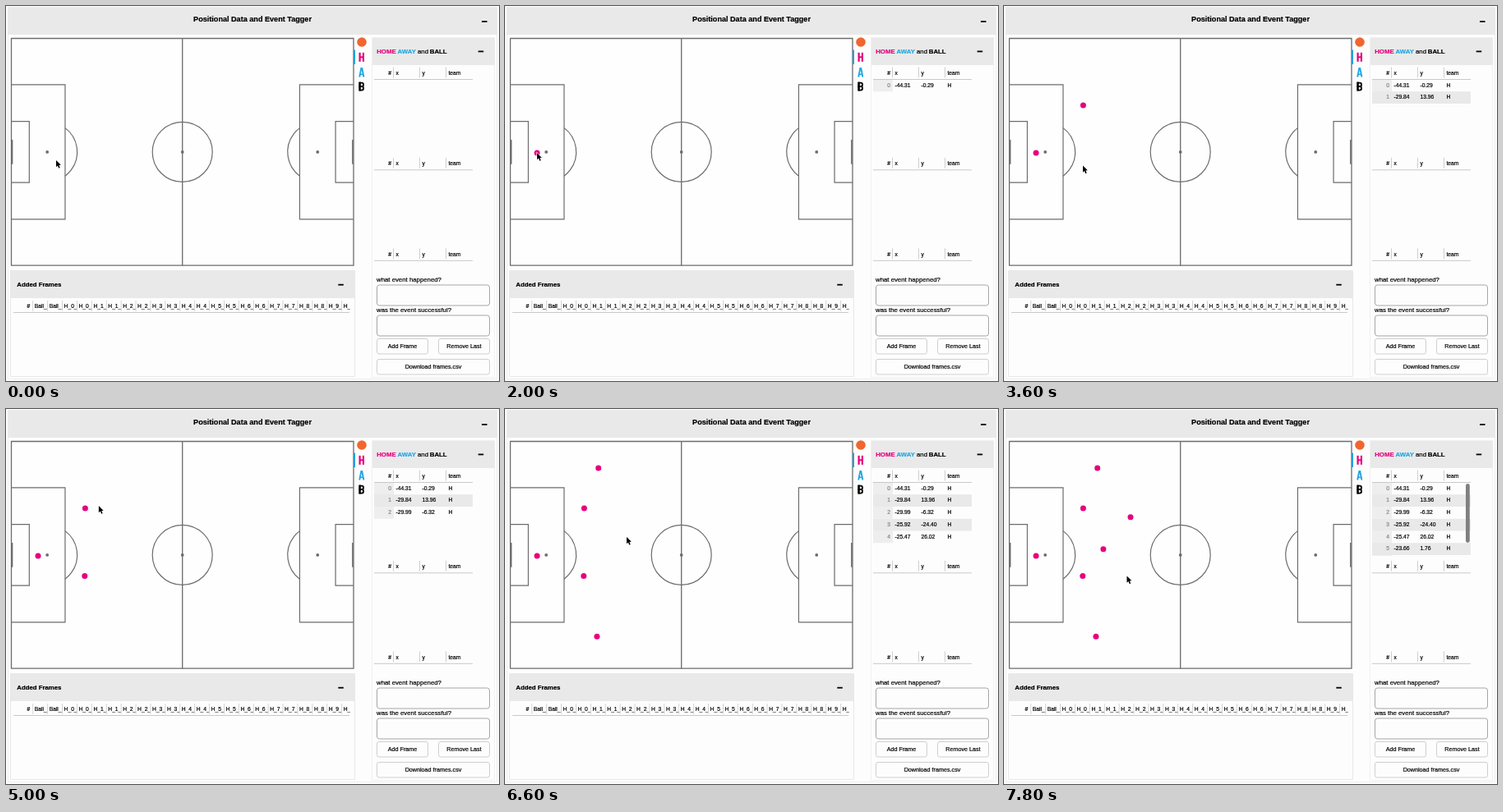
Animation of 600x457 px, one loop 8 s. Source, as an HTML page with a canvas:

```html
<!DOCTYPE html>
<html lang="en">
<head>
<meta charset="utf-8">
<title>Positional Data and Event Tagger</title>
<style>
html, body { margin: 0; width: 100%; height: 100%; overflow: hidden; background: #fdfdfd; }
canvas { display: block; width: 600px; height: 457px; }
</style>
</head>
<body>
<canvas id="stage"></canvas>
<script>
const W = 600, H = 457, LOOP = 8000, STEP = 200;
const PINK = '#e6007e', BLUE = '#22a7e0', LINE = '#6c6c6c', HEAD = '#e9e9e9', INK = '#000';
const canvas = document.getElementById('stage');
const g = canvas.getContext('2d');
const dpr = window.devicePixelRatio || 1;
canvas.width = W * dpr;
canvas.height = H * dpr;

// field metres to screen
const fx = m => 214.7 + m * 3.965;
const fy = m => 177.9 - m * 4.067;

const player = (shown, mx, my) => ({ shown, mx, my, x: fx(mx), y: fy(my) });
const players = [
  player(2000, -44.31, -0.29),
  player(3400, -29.84, 13.96),
  player(4400, -29.99, -6.32),
  player(5200, -25.92, -24.40),
  player(6000, -25.47, 26.02),
  player(6800, -23.66, 1.76),
  player(7400, -15.31, 11.35)
];

// pointer moves: leave time, arrival time, goal
const moves = [
  [0, 600, players[0]],
  [2000, 3000, players[1]],
  [3200, 3800, players[2]],
  [4000, 4600, players[3]],
  [4600, 5360, players[4]],
  [5500, 6100, players[5]],
  [6200, 6600, { x: 148, y: 156 }],
  [6600, 7000, players[6]],
  [7200, 7800, { x: 149.5, y: 203.5 }]
];

function pointerAt(t) {
  let x = 61, y = 188;
  for (const [leave, arrive, to] of moves) {
    const k = Math.min(1, Math.max(0, (t - leave) / (arrive - leave)));
    x += (to.x - x) * k;
    y += (to.y - y) * (1 - (1 - k) ** 2);
  }
  return [x, y];
}

function text(s, x, y, size, { color = INK, bold = false, align = 'left' } = {}) {
  g.font = `${bold ? 'bold ' : ''}${size}px "Liberation Sans", Arial, sans-serif`;
  g.textAlign = align;
  g.fillStyle = g.strokeStyle = color;
  g.lineWidth = 0.2;
  g.fillText(s, x, y);
  g.strokeText(s, x, y);
}

function fill(x, y, w, h, color) {
  g.fillStyle = color;
  g.fillRect(x, y, w, h);
}

function frame(x, y, w, h, color, lw = 1, r = 0) {
  g.beginPath();
  g.roundRect(x, y, w, h, r);
  g.strokeStyle = color;
  g.lineWidth = lw;
  g.stroke();
}

function disc(x, y, r, color) {
  g.beginPath();
  g.arc(x, y, r, 0, Math.PI * 2);
  g.fillStyle = color;
  g.fill();
}

function arc(x, y, r, from, to) {
  g.beginPath();
  g.arc(x, y, r, from, to);
  g.stroke();
}

function poly(points, color, lw) {
  g.beginPath();
  points.forEach(([x, y]) => g.lineTo(x, y));
  g.strokeStyle = color;
  g.lineWidth = lw;
  g.stroke();
}

function minus(x, y) {
  fill(x, y, 6.5, 1.8, INK);
}

function panels() {
  fill(0, 0, W, H, '#fdfdfd');
  frame(2.5, 1.5, 595, 453, '#ededed');
  frame(5.5, 322.5, 419, 129, '#e8e8e8');
  frame(445.5, 38.5, 149, 414, '#f0f0f0');
  fill(2, 2, 596, 33, HEAD);
  fill(6, 323, 418, 33, HEAD);
  fill(446, 39, 149, 33, HEAD);
  text('Positional Data and Event Tagger', 300, 19, 9.1, { bold: true, align: 'center' });
  text('Added Frames', 13.3, 342.3, 7.8, { bold: true });
  text('HOME', 451.2, 57.6, 7.8, { bold: true, color: PINK });
  text('AWAY', 476.6, 57.6, 7.8, { bold: true, color: BLUE });
  text('and', 501, 57.6, 7.8);
  text('BALL', 515.8, 57.6, 7.8, { bold: true });
  minus(579, 18);
  minus(574.7, 54.5);
  minus(404.3, 338.8);
}

function pitch() {
  const w = 52.5, r = 36.5;
  fill(6, 39, 418, 278, '#fefefe');
  frame(6.5, 39.5, 416.5, 276.7, LINE, 1.3);
  poly([[fx(0), 39], [fx(0), 316.5]], LINE, 1.3);
  g.lineWidth = 1.2;
  arc(fx(0), fy(0), r, 0, Math.PI * 2);
  disc(fx(0), fy(0), 1.9, LINE);
  for (const side of [-1, 1]) {
    const x = depth => fx(side * (w - depth));
    const area = (depth, half) =>
      poly([[x(0), fy(half)], [x(depth), fy(half)], [x(depth), fy(-half)], [x(0), fy(-half)]], LINE, 1.2);
    area(16.5, 20.16);
    area(5.5, 9.16);
    poly([[x(0.25), fy(3.66)], [x(0.25), fy(-3.66)]], LINE, 1.6);
    disc(x(11), fy(0), 1.9, LINE);
    const mid = side < 0 ? 0 : Math.PI;
    const half = Math.acos(5.5 * 3.965 / r);
    g.lineWidth = 1.2;
    arc(x(11), fy(0), r, mid - half, mid + half);
  }
}

function toolbar() {
  disc(433, 44, 5.8, '#f0662f');
  fill(423, 53.5, 2, 17.5, '#26a0da');
  fill(429.5, 56.8, 2.2, 11, PINK);
  fill(433.8, 56.8, 2.2, 11, PINK);
  fill(431, 61.3, 4, 2, PINK);
  poly([[430.2, 86.5], [432.3, 75.9], [433.3, 75.9], [435.4, 86.5]], BLUE, 1.9);
  fill(431, 82.5, 3.6, 1.6, BLUE);
  fill(429.5, 92.6, 2.2, 10.8, INK);
  g.strokeStyle = INK;
  g.lineWidth = 1.9;
  for (const y of [95.8, 100.3]) {
    g.beginPath();
    g.roundRect(430.5, y - 2.2, 4.5, 4.5, [0, 2, 2, 0]);
    g.stroke();
  }
}

function tableHead(y) {
  fill(448, y + 7.5, 120, 1, '#c9c9c9');
  ['x', 'y', 'team'].forEach((label, i) => {
    fill(471 + i * 32, y - 7, 1, 13, '#cfcfcf');
    text(label, 474.5 + i * 32, y + 2.4, 6.7);
  });
  text('#', 469, y + 2.4, 6.7, { align: 'right' });
}

function homeRows(list) {
  const rowH = 14.75;
  g.save();
  g.beginPath();
  g.rect(448, 90, 122, 89);
  g.clip();
  list.forEach((p, i) => {
    const y = 89.5 + i * rowH;
    fill(448, y, 24, rowH, '#eeeeee');
    if (i % 2) fill(448, y, 120, rowH, HEAD);
    text(i, 469, y + 9.1, 6.7, { color: '#858585', align: 'right' });
    [p.mx.toFixed(2), p.my.toFixed(2), 'H'].forEach((s, c) =>
      text(s, 474.5 + c * 32, y + 9.1, 6.7));
  });
  g.restore();
  if (list.length > 6) {
    g.beginPath();
    g.roundRect(562, 91, 4.8, 72, 2.4);
    g.fillStyle = '#808080';
    g.fill();
  }
}

function addedTable() {
  fill(9, 373, 409, 1, '#c9c9c9');
  text('#', 29.3, 368, 6.7, { align: 'right' });
  for (let i = 0; i < 22; i++) {
    const x = 32.3 + i * 17.9;
    fill(x, 359, 0.9, 13, '#cfcfcf');
    g.save();
    g.beginPath();
    g.rect(x, 358, Math.min(18.2, 418.8 - x), 15);
    g.clip();
    text(i < 2 ? 'Ball_' : `H_${(i >> 1) - 1}_`, x + 2.5, 368, 6.7);
    g.restore();
  }
}

function button(label, x, y, w) {
  frame(x, y, w, 18.5, '#cfcfcf', 1, 2.5);
  text(label, x + w / 2, y + 11.6, 7.2, { align: 'center' });
}

function field(label, y) {
  text(label, 451, y - 3.7, 7.8);
  frame(451.5, y, 137, 25, '#a6a6a6', 1, 3);
}

function form() {
  field('what event happened?', 340);
  field('was the event successful?', 377);
  button('Add Frame', 451.5, 405.5, 62);
  button('Remove Last', 526.5, 405.5, 62);
  button('Download frames.csv', 451.5, 430.5, 137);
}

function pointer(x, y) {
  g.beginPath();
  for (const [dx, dy] of [[0, 0], [0, 8.2], [1.9, 6.5], [3.3, 9.7], [4.7, 9.1], [3.4, 6], [5.8, 5.8]]) {
    g.lineTo(x + dx, y + dy);
  }
  g.closePath();
  g.strokeStyle = '#fff';
  g.lineWidth = 1.2;
  g.stroke();
  g.fillStyle = INK;
  g.fill();
}

function draw(now) {
  // the screen refreshes five times a second
  const t = Math.floor((now % LOOP) / STEP) * STEP;
  const shown = players.filter(p => p.shown <= t);
  g.setTransform(dpr, 0, 0, dpr, 0, 0);
  panels();
  pitch();
  toolbar();
  [81.5, 191.8, 302.3].forEach(tableHead);
  homeRows(shown);
  addedTable();
  form();
  shown.forEach(p => disc(p.x, p.y, 3.5, PINK));
  pointer(...pointerAt(t));
}

const start = performance.now();
function tick() {
  draw(performance.now() - start);
  requestAnimationFrame(tick);
}
tick();
</script>
</body>
</html>
```
